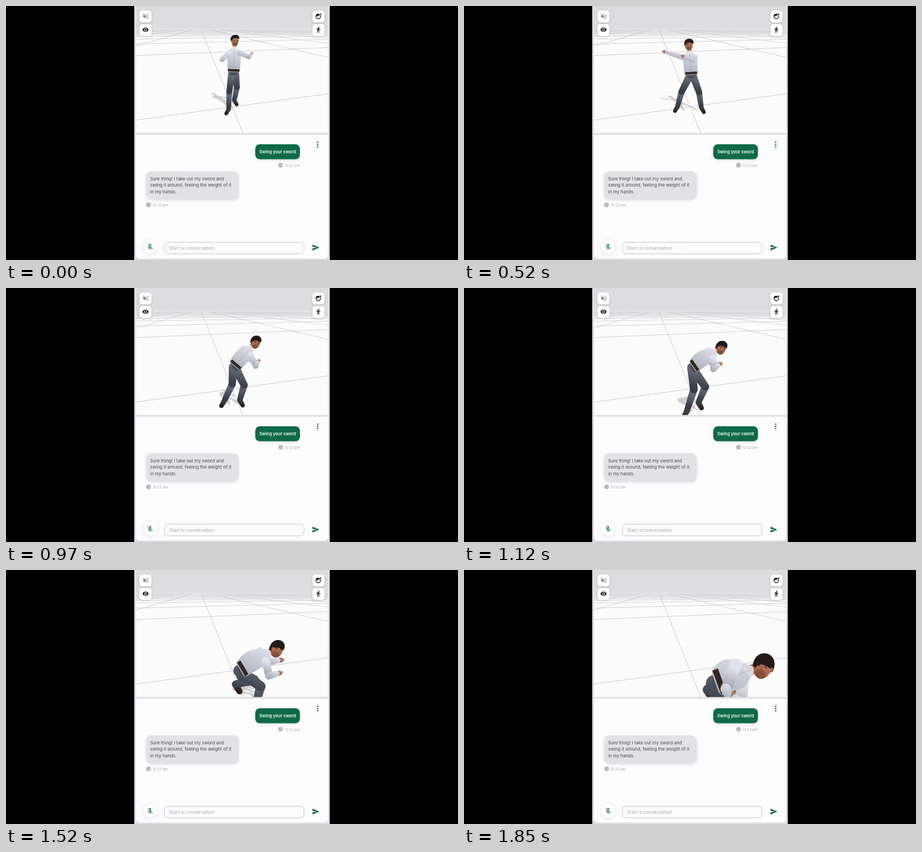
Animation of 800 by 450 pixels, one loop 1880 ms. Source, as an HTML page with a canvas:

```html
<!DOCTYPE html>
<html lang="en">
<head>
<meta charset="utf-8">
<title>Avatar chat</title>
<style>
html, body { margin: 0; width: 100%; height: 100%; overflow: hidden; background: #000; }
canvas { display: block; }
</style>
</head>
<body>
<canvas id="stage" width="800" height="450"></canvas>
<script>
const ctx = document.getElementById('stage').getContext('2d');
const LOOP = 1880, GREEN = '#0f6a47', TAU = Math.PI * 2;
const FONT = 'Inter, "Open Sans", sans-serif';
const SHIRT = ['#e2e3ec', '#a2a5b2'], CLOTH = ['#626974', '#383d47'];
const SKIN = ['#cc9170', '#8f5138'], SHOE = ['#4d3a33', '#211715'];

// ---------- math ----------
const mix = (a, b, k) => [a[0] + (b[0] - a[0]) * k, a[1] + (b[1] - a[1]) * k];
const add = (a, d, k) => [a[0] + d[0] * k, a[1] + d[1] * k];
const gap = (a, b) => Math.hypot(b[0] - a[0], b[1] - a[1]);
const unit = d => {
  const l = Math.hypot(...d) || 1;
  return [d[0] / l, d[1] / l];
};
const smooth = (from, to, t) => {
  const u = Math.min(1, Math.max(0, (t - from) / (to - from)));
  return u * u * (3 - 2 * u);
};

// ---------- motion ----------
// paths of the few leading points; every other joint follows by rule
const BEATS = [0, 520, 790, 1120, 1360, 1670, 1850];

function path(...pts) {
  const slope = (i, c) => pts[i - 1] && pts[i + 1]
    ? .75 * (pts[i + 1][c] - pts[i - 1][c]) / (BEATS[i + 1] - BEATS[i - 1]) : 0;
  return t => {
    let i = 0;
    while (i < BEATS.length - 2 && t >= BEATS[i + 1]) i++;
    const d = BEATS[i + 1] - BEATS[i], u = Math.min(1, (t - BEATS[i]) / d), e = u * u * (3 - 2 * u);
    return [0, 1].map(c => pts[i][c] + (pts[i + 1][c] - pts[i][c]) * e
      + d * u * (1 - u) * (slope(i, c) * (1 - u) - slope(i + 1, c) * u));
  };
}

const headPath = path([405, 61], [398, 68], [423, 84], [455, 105], [461, 122], [499, 154], [530, 169]);
const waistPath = path([403, 114], [402, 119], [406, 135], [408, 137], [414, 156], [426, 190], [452, 197]);
const handPath = {
  A: path([388, 90], [355, 81], [420, 117], [450, 134], [443, 117], [520, 203], [467, 222]),
  B: path([434, 85], [388, 89], [434, 123], [453, 135], [454, 149], [507, 214], [478, 223])
};
const footPath = {
  A: path([394, 183], [378, 178], [383, 176], [394, 219], [444, 224], [442, 242], [470, 246]),
  B: path([404, 167], [420, 180], [412, 192], [415, 203], [407, 203], [409, 203], [432, 212])
};

function poseAt(t) {
  const u = t / LOOP, s = 1.06 + .85 * u ** 2 + .8 * u ** 8; // nears the camera
  const front = 1 - smooth(800, 1100, t) + .4 * smooth(1600, 1850, t);
  const head = headPath(t), waist = waistPath(t);
  const down = unit([waist[0] - head[0], waist[1] - head[1]]), out = [-down[1], down[0]];
  const neck = add(head, down, (8 + 4.5 * front) * s), chest = add(neck, down, 8 * s);
  const p = {
    s, front, head, waist, neck, chest, out,
    bow: 6 * smooth(800, 1120, t) * s,
    tilt: .3 * smooth(700, 1100, t),
    face: .35 * (1 - smooth(0, 500, t)) + .6 * smooth(500, 1100, t) - .75 * smooth(1670, 1850, t),
    hair: -.5 + .5 * u,
    near: t < 950 ? 'AB' : t < 1760 ? 'B' : 'A'
  };
  for (const [n, side] of [['A', -1], ['B', 1]]) {
    const shoulder = add(chest, out, -side * (5.5 + 3 * front) * s);
    const belt = add(waist, out, -side * (6 + 1.4 * front) * s);
    const hand = handPath[n](t), ankle = footPath[n](t);
    const hip = add(mix(waist, belt, .45), mix(down, [0, 1], .6), 6 * s);
    // slack in a limb pushes its middle joint out
    const slack = (a, b, len) => Math.sqrt(Math.max(0, (len * s) ** 2 - gap(a, b) ** 2 / 4));
    const elbowDir = unit([side * front - .4 * (1 - front), 1]);
    const kneeDir = [.5 + (side * .15 - .5) * front, 0];
    p[n] = {
      shoulder, belt, hand, ankle, hip,
      elbow: add(mix(shoulder, hand, .5), elbowDir, slack(shoulder, hand, 13)),
      knee: add(mix(hip, ankle, .5), kneeDir, slack(hip, ankle, 31)),
      toe: add(ankle, [side * 4, 7], s)
    };
  }
  return p;
}

// ---------- drawing helpers ----------
let flat = null; // one colour for the shadow pass

function shade(m, r, [light, dark]) {
  if (flat) return flat;
  const g = ctx.createLinearGradient(m[0] + r * .3, m[1] - r, m[0] - r * .5, m[1] + r);
  g.addColorStop(0, light);
  g.addColorStop(1, dark);
  return g;
}

function limb(a, b, r1, r2, tones) {
  const t = Math.atan2(b[1] - a[1], b[0] - a[0]), q = Math.PI / 2;
  ctx.fillStyle = shade(mix(a, b, .5), Math.max(r1, r2) * 1.5, tones);
  ctx.beginPath();
  ctx.arc(a[0], a[1], r1, t + q, t - q);
  ctx.arc(b[0], b[1], r2, t - q, t + q);
  ctx.closePath();
  ctx.fill();
}

function blob(pad, fill) {
  ctx.closePath();
  ctx.fillStyle = ctx.strokeStyle = fill;
  ctx.lineWidth = pad * 2;
  ctx.lineJoin = 'round';
  ctx.fill();
  ctx.stroke();
}

function hull(points, pad, fill) {
  ctx.beginPath();
  points.forEach(p => ctx.lineTo(...p));
  blob(pad, fill);
}

function line(points, color, width, cap = 'round') {
  ctx.beginPath();
  points.forEach(p => ctx.lineTo(...p));
  ctx.strokeStyle = color;
  ctx.lineWidth = width;
  ctx.lineCap = cap;
  ctx.stroke();
}

function oval(x, y, rx, ry, color) {
  ctx.fillStyle = color;
  ctx.beginPath();
  ctx.ellipse(x, y, rx, ry, 0, 0, TAU);
  ctx.fill();
}
const disc = (x, y, r, color) => oval(x, y, r, r, color);

function arc(x, y, r, color, width, from = 0, to = TAU) {
  ctx.strokeStyle = color;
  ctx.lineWidth = width;
  ctx.beginPath();
  ctx.arc(x, y, r, from, to);
  ctx.stroke();
}

// ---------- character ----------
function leg({ s }, { hip, knee, ankle, toe }) {
  limb(mix(ankle, toe, .2), toe, 3.4 * s, 3 * s, SHOE);
  limb(knee, ankle, 4.9 * s, 3.7 * s, CLOTH);
  limb(hip, knee, 6 * s, 4.9 * s, CLOTH);
}

function arm({ s }, { shoulder, elbow, hand }) {
  const cuff = mix(elbow, hand, .78), dir = unit([hand[0] - elbow[0], hand[1] - elbow[1]]);
  limb(cuff, hand, 2.3 * s, 2.6 * s, SKIN);
  limb(hand, add(hand, dir, 2.4 * s), 2.3 * s, 1.5 * s, SKIN);
  limb(shoulder, elbow, 4.4 * s, 3.7 * s, SHIRT);
  limb(elbow, cuff, 3.7 * s, 2.8 * s, SHIRT);
}

function torso(p) {
  const { s, A, B, neck, waist, out } = p;
  hull([A.belt, B.belt, B.hip, A.hip], 2 * s, flat || '#474e59');
  limb(neck, mix(neck, p.head, .5), 3.4 * s, 3.4 * s, SKIN);
  const back = add(mix(A.shoulder, A.belt, .5), out, p.bow);
  ctx.beginPath();
  ctx.moveTo(...A.belt);
  ctx.quadraticCurveTo(...back, ...A.shoulder);
  for (const q of [neck, B.shoulder, B.belt]) ctx.lineTo(...q);
  blob(3 * s, shade(mix(p.chest, waist, .5), 20 * s, SHIRT));
  line([add(A.belt, out, 2 * s), add(B.belt, out, -2 * s)], flat || '#33271f', 4 * s, 'butt');
  if (flat) return;
  ctx.globalAlpha = p.front * .8;
  line([neck, mix(neck, waist, .9)], '#9598a6', .7 * s);
  line([[-4, -2], [0, 3], [4, -2]].map(d => add(neck, d, s)), '#eceef4', 1.6 * s);
  ctx.globalAlpha = 1;
}

function head(p) {
  const f = p.face, h = p.hair, cx = f * .55;
  ctx.save();
  ctx.translate(...p.head);
  ctx.rotate(p.tilt);
  ctx.scale(7.3 * p.s, 7.3 * p.s);
  oval(f * .12, .1, .85, 1.2, shade([f * .2, 0], 1.5, SKIN));
  if (!flat) {
    oval(f * .25, .85, .5, .42, 'rgba(70,38,28,.28)');
    for (const d of [-.34, .34]) {
      line([[cx + d - .15, -.06], [cx + d + .15, -.06]], '#3a241b', .1);
      line([[cx + d - .08, .12], [cx + d + .08, .12]], '#43281f', .1);
    }
    line([[cx + f * .1, .12], [cx + f * .3, .5]], 'rgba(110,60,42,.5)', .12);
    line([[cx - .18, .77], [cx + .18, .77]], '#8a4a3c', .1);
  }
  ctx.fillStyle = flat || '#241b17';
  ctx.beginPath();
  ctx.moveTo(-.95, h + .4 + f * .35);
  ctx.bezierCurveTo(-1.3, -1.6, 1.3, -1.7, 1, h + .3 - f * .35);
  ctx.quadraticCurveTo(.75, h, f * .3, h - .05);
  ctx.quadraticCurveTo(-.6, h, -.65, h + .5 + f * .35);
  ctx.fill();
  if (!flat) oval(-Math.sign(f) * (.95 - Math.abs(f) * .7), .2, .13, .24, '#a9684c');
  ctx.restore();
}

function body(p) {
  const far = 'AB'.replace(p.near, '');
  const legs = [p.A, p.B].sort((a, b) => a.ankle[1] - b.ankle[1]);
  legs.forEach(l => leg(p, l));
  if (far) arm(p, p[far]);
  torso(p);
  if (p.near === 'A') arm(p, p.A);
  head(p);
  if (p.near !== 'A') [...p.near].forEach(n => arm(p, p[n]));
}

function figure(t) {
  const p = poseAt(t), [fx, fy] = mix(p.A.ankle, p.B.ankle, .5);
  ctx.save();
  ctx.beginPath();
  ctx.rect(230, 1, 340, 224);
  ctx.clip();
  // cast shadow: the same body sheared onto the floor
  ctx.save();
  flat = '#cfced1';
  ctx.translate(fx, fy + 4);
  ctx.transform(.5, 0, .3, .2, 0, 0);
  ctx.translate(-fx, -fy);
  body(p);
  flat = null;
  ctx.restore();
  body(p);
  ctx.restore();
}

// ---------- scene and interface ----------
function box(x, y, w, h, r, fill, blur = 0, alpha = .16) {
  ctx.save();
  ctx.shadowColor = `rgba(40,40,60,${alpha})`;
  ctx.shadowBlur = blur;
  ctx.shadowOffsetY = blur ? 1.5 : 0;
  ctx.fillStyle = fill;
  ctx.beginPath();
  ctx.roundRect(x, y, w, h, r);
  ctx.fill();
  ctx.restore();
}

function text(s, x, y, size, color, weight = 400) {
  ctx.font = `${weight} ${size}px ${FONT}`;
  ctx.fillStyle = color;
  ctx.fillText(s, x, y);
}

function icon(d, x, y, size, color) {
  ctx.save();
  ctx.translate(x - size / 2, y - size / 2);
  ctx.scale(size / 24, size / 24);
  ctx.fillStyle = color;
  ctx.fill(new Path2D(d));
  ctx.restore();
}

function floor() {
  const g = ctx.createLinearGradient(0, 1, 0, 58), horizon = 38;
  [[0, '#dcdbdd'], [.66, '#dddcde'], [.8, '#eeedef'], [1, '#fdfcfd']].forEach(c => g.addColorStop(...c));
  ctx.save();
  ctx.beginPath();
  ctx.roundRect(230, 1, 340, 224, [6, 6, 0, 0]);
  ctx.clip();
  ctx.fillStyle = g;
  ctx.fillRect(230, 1, 340, 224);
  // two families of parallels meeting on the horizon
  ctx.beginPath();
  ctx.rect(230, 42, 340, 183);
  ctx.clip();
  for (let k = 0; k < 13; k++) {
    const d = 1 / (.0071 + .0163 * k), m = d / 1030;
    ctx.globalAlpha = Math.max(.15, 1 - k * .09);
    line([[230, horizon + d + 170 * m], [570, horizon + d - 170 * m]], '#c8c7cb', 1, 'butt');
  }
  for (let k = -7; k <= 7; k++) {
    const m = .401 + 3.86 * k;
    ctx.globalAlpha = Math.max(.2, 1 - Math.abs(k) * .13);
    line([[344, horizon], [344 + m * 190, horizon + 190]], '#c8c7cb', 1, 'butt');
  }
  ctx.restore();
}

function clock(x, y) {
  disc(x, y, 4, '#a3a2a6');
  arc(x, y, 2.6, '#e9e8ea', .7);
  line([[x, y - 1.6], [x, y], [x + 1.2, y + .8]], '#f4f3f5', .7);
}

function slash(x, y, w, color, back) {
  line([[x + .8, y - .2], [x + w + .8, y + w - .2]], back, 1.3);
  line([[x, y], [x + w, y + w]], color, 1);
}

function buttons() {
  const ink = '#111', gray = '#77767a';
  for (const x of [236.5, 542.5]) for (const y of [8, 32]) box(x, y, 21, 21, 5, '#fff', 4);
  // muted speaker
  hull([[243, 16.7], [244.3, 16.7], [246.5, 14.5], [246.5, 21.5], [244.3, 19.3], [243, 19.3]], .3, gray);
  for (const r of [2.3, 4.6]) arc(247, 18, r, gray, .9, -1.1, 1.1);
  slash(242.3, 13.5, 9, gray, '#fff');
  icon('M12 4.5C7 4.5 2.7 7.6 1 12c1.7 4.4 6 7.5 11 7.5s9.3-3.1 11-7.5c-1.7-4.4-6-7.5-11-7.5z', 247, 42, 12, ink);
  disc(247, 42, 2.6, '#fff');
  disc(247, 42, 1.6, ink);
  // face with a plus
  arc(552.7, 18.5, 4.2, ink, 1.2);
  ctx.fillStyle = ink;
  ctx.beginPath();
  ctx.arc(552.7, 18.5, 4.2, Math.PI, TAU - .5);
  ctx.quadraticCurveTo(551.5, 16.8, 548.5, 18.5);
  ctx.fill();
  disc(556.8, 14.6, 2.2, '#fff');
  line([[555.5, 14.6], [558.1, 14.6]], ink, 1);
  line([[556.8, 13.3], [556.8, 15.9]], ink, 1);
  for (const x of [551.2, 554.3]) disc(x, 19.4, .6, ink);
  icon('M13.5 5.5c1.1 0 2-.9 2-2s-.9-2-2-2-2 .9-2 2 .9 2 2 2zM9.8 8.9 7 23h2.1l1.8-8 2.1 2v6h2v-7.5l-2.1-2 .6-3C14.8 12 16.8 13 19 13v-2c-1.9 0-3.5-1-4.3-2.4l-1-1.6c-.4-.6-1-1-1.7-1-.3 0-.5.1-.8.1L6 8.3V13h2V9.6z', 553, 42, 12, ink);
}

function chat() {
  box(230, 228, 340, 219.5, [0, 0, 7, 7], '#fdfcfe');
  for (const d of [-4, 0, 4]) disc(551.7, 245.3 + d, 1.25, GREEN);
  box(441.2, 245, 79, 26.5, 8, GREEN, 5);
  text('Swing your sword', 448.2, 260.7, 7.5, '#f4faf7', 600);
  clock(486, 282);
  text('12:22 pm', 493.3, 284.5, 6.2, '#a3a2a7');
  box(248, 293, 163.5, 49.5, 9, '#e2e1e4', 5);
  ['Sure thing! I take out my sword and', 'swing it around, feeling the weight of it', 'in my hands.']
    .forEach((s, i) => text(s, 255, 308.7 + i * 11.4, 7.85, '#4b4a4e'));
  clock(252.3, 352.3);
  text('12:22 pm', 259.8, 354.8, 6.2, '#a3a2a7');

  // muted microphone
  box(243, 414.5, 24, 24, 12, '#fff', 8, .12);
  line([[255, 423.2], [255, 426.5]], GREEN, 3.2);
  arc(255, 426.4, 3.3, GREEN, 1, 0, Math.PI);
  line([[255, 429.7], [255, 431.5]], GREEN, 1);
  slash(250.6, 421.8, 9, GREEN, '#fff');

  ctx.beginPath();
  ctx.roundRect(280.5, 418.5, 247, 20.5, 6);
  ctx.strokeStyle = '#c3c2c8';
  ctx.lineWidth = 1;
  ctx.stroke();
  text('Start a conversation', 288.3, 432, 8.5, '#aaa9ae');
  icon('M2 21 23 12 2 3v7l15 2-15 2z', 548.3, 428, 14, GREEN);
}

function draw(t) {
  ctx.fillStyle = '#000';
  ctx.fillRect(0, 0, 800, 450);
  ctx.fillStyle = '#dfdde4';
  ctx.fillRect(227, 0, 346, 450);
  floor();
  figure(t);
  buttons();
  chat();
}

const start = performance.now();
function tick() {
  draw((performance.now() - start) % LOOP);
  requestAnimationFrame(tick);
}
tick();
</script>
</body>
</html>
```
